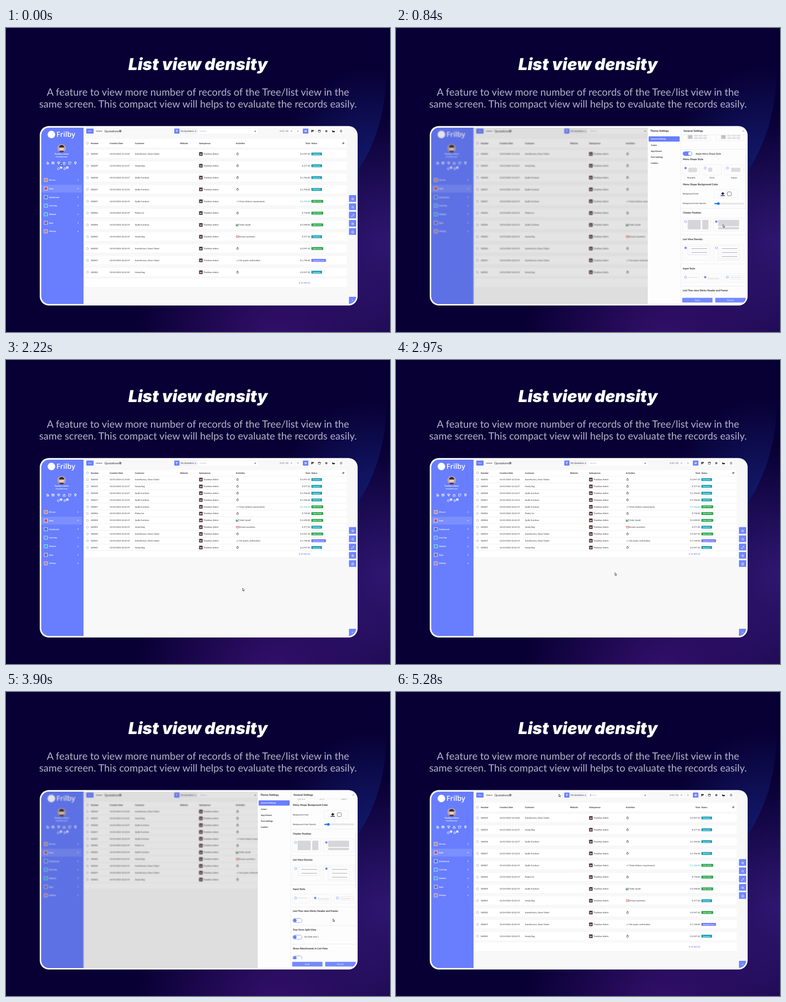
Recreate the animation shown at these times as an HTML page with a canvas. Size 842x665 px, loop 5310 ms.

```html
<!DOCTYPE html>
<html lang="en">
<head>
<meta charset="utf-8">
<title>List view density</title>
<style>
html, body { margin: 0; width: 100%; height: 100%; overflow: hidden; background: #080034; }
canvas { display: block; }
</style>
</head>
<body>
<canvas id="stage" width="842" height="665"></canvas>
<script>
const W = 842, H = 665, LOOP = 5310, STEP = 30;
const NIGHT = '#080034', BLUE = '#6b80ff', INK = '#23232b', LINE = '#e9e9ec', GREY = '#dcdcde';
const SCROLL = 217;
const stage = document.getElementById('stage').getContext('2d');
let g = stage;

// ---------- drawing helpers ----------
function text(str, x, y, size, { color = INK, weight = 400, align = 'left', font = 'Lato', style = '', spacing = 0 } = {}) {
  g.font = `${style} ${weight} ${size}px ${font}, sans-serif`;
  g.textRendering = 'geometricPrecision';
  g.letterSpacing = spacing + 'px';
  g.textAlign = align;
  g.fillStyle = color;
  g.fillText(str, x, y + size * 0.355);
}
function box(x, y, w, h, r, fill, stroke, width = 0.6) {
  g.beginPath();
  g.roundRect(x, y, w, h, r);
  if (fill) { g.fillStyle = fill; g.fill(); }
  if (stroke) { g.strokeStyle = stroke; g.lineWidth = width; g.stroke(); }
}
function dot(x, y, r, fill, stroke, width = 0.7) {
  g.beginPath();
  g.arc(x, y, r, 0, Math.PI * 2);
  if (fill) { g.fillStyle = fill; g.fill(); }
  if (stroke) { g.strokeStyle = stroke; g.lineWidth = width; g.stroke(); }
}
function line(points, color, width = 0.8) {
  g.beginPath();
  points.forEach(([x, y]) => g.lineTo(x, y));
  g.strokeStyle = color;
  g.lineWidth = width;
  g.stroke();
}
function poly(points, fill) {
  g.beginPath();
  points.forEach(([x, y]) => g.lineTo(x, y));
  g.closePath();
  g.fillStyle = fill;
  g.fill();
}
function chevron(x, y, dir, color, s = 1.5, width = 0.9) {
  const shapes = {
    right: [[-s / 2, -s], [s / 2, 0], [-s / 2, s]],
    left: [[s / 2, -s], [-s / 2, 0], [s / 2, s]],
    down: [[-s, -s / 2], [0, s / 2], [s, -s / 2]]
  };
  line(shapes[dir].map(([a, b]) => [x + a, y + b]), color, width);
}
function glow(x, y, r, color, alpha = 1) {
  const fade = g.createRadialGradient(x, y, 0, x, y, r);
  fade.addColorStop(0, `rgba(${color},${alpha})`);
  fade.addColorStop(0.5, `rgba(${color},${alpha * 0.5})`);
  fade.addColorStop(1, `rgba(${color},0)`);
  g.fillStyle = fade;
  g.fillRect(0, 0, W, H);
}
function layer(draw) {
  const c = document.createElement('canvas');
  c.width = W;
  c.height = H;
  g = c.getContext('2d');
  draw();
  g = stage;
  return c;
}

// ---------- poster ----------
function drawPoster() {
  g.fillStyle = NIGHT;
  g.fillRect(0, 0, W, H);
  glow(800, 590, 300, '30,12,84', 0.7);
  glow(835, 470, 280, '46,22,112');
  glow(590, 690, 310, '52,16,108');
  g.save();
  g.beginPath();
  g.arc(438, 100, 396, 0, Math.PI * 2);
  g.clip();
  g.fillStyle = NIGHT;
  g.fillRect(0, 0, W, 340);
  glow(802, 285, 200, '18,24,104');
  g.restore();

  text('List view density', 421, 79, 36, { color: '#fff', weight: 900, align: 'center', font: 'Inter', style: 'italic' });
  const sub = { color: '#b6b2cb', align: 'center', spacing: 0.05 };
  text('A feature to view more number of records of the Tree/list view in the', 421, 140, 22, sub);
  text('same screen. This compact view will helps to evaluate the records easily.', 421, 166, 22, sub);
  box(74, 214.5, 697, 392.5, 20, '#fff');
}

// ---------- application page ----------
const ADMIN = 'Thaddeus Admin', SHOP = 'SomeFactory, Owen Tarbet';
const RUG = 'Handy Rug', SOFA = 'Quillo Furniture', WOOD = 'Planko Inc';
const LATE = '10/24/2024 22:22:19';
const ROWS = [
  ['S00040', '10/25/2024 12:13:05', SHOP, '', '2,947.50', 'Quotation'],
  ['S00039', '10/25/2024 12:12:37', RUG, '', '377.50', 'Quotation'],
  ['S00038', '10/25/2024 12:12:27', SOFA, '', '1,706.00', 'Quotation'],
  ['S00037', '10/25/2024 12:12:24', SOFA, '', '1,706.00', 'Quotation'],
  ['S00007', LATE, SOFA, 'Check delivery requirements', '1,706.00', 'Sales Order'],
  ['S00006', LATE, WOOD, '', '750.00', 'Sales Order'],
  ['S00004', LATE, SOFA, 'Order Upsell', '2,240.00', 'Sales Order'],
  ['S00003', LATE, RUG, 'Answer questions', '377.50', 'Quotation'],
  ['S00020', LATE, SHOP, '', '2,947.50', 'Sales Order'],
  ['S00019', LATE, SHOP, 'Get quote confirmation', '1,740.00', 'Quotation Sent'],
  ['S00002', LATE, RUG, '', '2,947.50', 'Quotation']
];
const BADGES = {
  'Quotation': ['#1b9fb3', 23.5],
  'Sales Order': ['#28a548', 26],
  'Quotation Sent': ['#6b74ff', 32]
};
const MENU = [
  ['Discuss', '#d08a4a'], ['Sales', '#c4524f'], ['Dashboards', '#3f78b5'], ['Invoicing', '#35a5e0'],
  ['Website', '#20b4c4'], ['Apps', '#7a6a9c'], ['Settings', '#c97a80']
];

function portrait(x, y, s) {
  g.save();
  g.translate(x, y);
  g.scale(s, s);
  dot(0, 0.05, 0.5, '#f0c9bb');
  g.beginPath();
  g.arc(0, -0.15, 0.58, Math.PI, 0);
  g.fillStyle = '#35282c';
  g.fill();
  g.beginPath();
  g.ellipse(0, 0.95, 0.7, 0.42, 0, Math.PI, 0);
  g.fillStyle = '#463c48';
  g.fill();
  g.restore();
}

function drawSidebar() {
  g.fillStyle = '#687eff';
  g.fillRect(66, 205, 104, 410);
  dot(99.5, 233, 8.3, '#fff');
  text('Frilby', 110.5, 232, 15.5, { color: '#fff', weight: 600, font: 'Open Sans' });

  dot(122, 263, 9.3, '#b9a6ae');
  g.save();
  g.beginPath();
  g.arc(122, 263, 9.3, 0, Math.PI * 2);
  g.clip();
  portrait(122, 263, 10);
  g.restore();
  const label = { color: '#fff', weight: 700, align: 'center' };
  text(ADMIN, 122, 275.5, 4.3, label);
  text('Good Afternoon', 122, 281.8, 3.6, label);

  const white = '#fff';
  box(89.3, 293, 2.4, 5, 0.3, null, white, 0.9);
  box(91.7, 295, 2, 3, 0.3, null, white, 0.9);
  box(100.5, 293, 5, 4.8, 0.4, null, white, 0.9);
  line([[100.5, 295], [105.5, 295]], white, 1.4);
  box(113, 293, 5, 2.6, 0.4, null, white, 1);
  line([[115.5, 295], [115.5, 298.5]], white, 1.4);
  box(125.2, 295, 4.6, 3.3, 0.4, null, white, 0.9);
  g.beginPath();
  g.arc(127.5, 295, 1.5, Math.PI, 0);
  g.stroke();
  line([[137.5, 293], [142.3, 293], [142.3, 296], [140.5, 298], [137.5, 298], [137.5, 293]], white, 0.9);
  dot(152.2, 294.6, 1.9, null, white, 1.2);
  line([[152.2, 296.5], [152.2, 299]], white, 1.2);
  dot(114.7, 307.8, 2.2, null, white, 0.9);
  dot(128.8, 307.8, 2.2, null, white, 0.9);
  line([[128.8, 308], [128.8, 306.5]], white, 0.7);
  for (const [x, n] of [[120.7, '5'], [134.5, '2']]) {
    box(x - 2.4, 303, 4.8, 4.8, 1, white);
    text(n, x, 305.4, 3.4, { color: '#4a5bd0', weight: 700, align: 'center' });
  }

  box(77, 343, 89.5, 17, 1, 'rgba(255,255,255,.13)');
  MENU.forEach(([name, color], i) => {
    const y = 332.6 + i * 18.72;
    box(82.7, y - 4.6, 9.2, 9.2, 1.4, 'rgba(255,255,255,.4)');
    box(84.6, y - 2.7, 5.4, 5.4, 1, color);
    text(name, 94.2, y, 4.3, { color: '#fff', weight: 700 });
    chevron(158, y, i === 1 ? 'down' : 'right', '#fff', 1.7);
  });
}

function drawToolbar() {
  box(176, 220, 16, 11, 1.2, BLUE);
  text('New', 184, 225.5, 4.3, { color: '#e4e8ff', align: 'center' });
  box(195, 220, 18, 11, 1.2, '#fff');
  text('Upload', 204, 225.5, 4.5, { align: 'center' });
  text('Quotations', 216, 225.5, 6.4);
  dot(250.5, 225.6, 1.7, null, '#333', 1.1);
  for (let a = 0; a < 8; a++) {
    dot(250.5 + 2.4 * Math.cos(a * Math.PI / 4), 225.6 + 2.4 * Math.sin(a * Math.PI / 4), 0.4, '#333');
  }

  box(369, 220, 182, 11, 1.2, '#fff');
  box(380, 220, 40, 11, 1, '#f3f3f6');
  box(369, 220, 11.3, 11, 1.2, BLUE);
  line([[372.6, 223.6], [376.8, 223.6], [374.7, 226], [374.7, 228], [372.6, 223.6]], '#fff', 0.8);
  text('My Quotations', 383, 225.6, 4.4);
  text('×', 415.3, 225.6, 6, { color: '#4656c8', weight: 700, align: 'center' });
  text('Search...', 426, 225.6, 4.4, { color: '#a9a9b0' });
  poly([[544.7, 225], [548.1, 225], [546.4, 227]], INK);

  text('1-11 / 11', 600, 225.5, 4.5);
  for (const [x, dir] of [[626, 'left'], [640, 'right']]) {
    box(x - 5, 220, 10.3, 11, 1.2, '#fff');
    chevron(x, 225.5, dir, '#333', 2, 0.8);
  }
  for (const x of [672, 687, 702.3, 718, 734.7]) box(x - 6, 220, 12, 11, 1.2, '#fff');
  box(651, 220, 12, 11, 1.2, BLUE);
  for (let i = 0; i < 3; i++) line([[654.6, 224 + i * 1.6], [659.6, 224 + i * 1.6]], '#fff', 0.9);
  box(669.6, 223, 2.2, 5, 0.2, '#222');
  box(672.3, 223, 2.2, 3, 0.2, '#222');
  box(684.7, 223.3, 4.8, 4.8, 0.4, null, '#333', 0.8);
  line([[684.7, 224.2], [689.5, 224.2]], '#333', 1.4);
  box(700.2, 223.3, 4.4, 4.8, 0.4, '#777');
  poly([[715.3, 223], [715.3, 228], [721, 228], [721, 226], [719.3, 224.6], [717.8, 226]], '#222');
  clock(734.7, 225.8);
}

function clock(x, y) {
  dot(x, y + 0.2, 2.1, null, '#333', 0.75);
  line([[x, y + 0.4], [x, y - 1]], '#333', 0.6);
  line([[x - 0.9, y - 2.6], [x + 0.9, y - 2.6]], '#333', 0.8);
}

function drawActivity(name, y) {
  if (!name) { clock(507.7, y); return; }
  if (name === 'Order Upsell') {
    line([[504.5, y - 2.5], [504.5, y + 2.4], [510.5, y + 2.4]], '#333', 0.7);
    line([[505, y + 1.8], [507, y - 0.3], [508, y + 0.4], [510.3, y - 2.2]], '#23994b', 1.3);
  } else if (name === 'Answer questions') {
    box(505, y - 2, 5.4, 4, 0.3, '#fff', '#c8504e', 0.8);
    line([[505, y - 2], [507.7, y + 0.4], [510.4, y - 2]], '#c8504e', 0.7);
  } else {
    line([[505.6, y + 0.2], [507, y + 1.7], [509.8, y - 1.5]], '#4a7a60', 0.9);
  }
  text(name, 511.3, y, 4.5);
}

function drawTable({ headY, headH, firstY, gap, rowH, footY }) {
  box(172, headY - headH / 2, 575, headH, 2, '#fff');
  const bold = { weight: 700 };
  dot(178.5, headY, 2.3, '#fff', '#8c96bd');
  [['Number', 186], ['Creation Date', 227.3], ['Customer', 282.8], ['Website', 381.7], ['Salesperson', 423.5], ['Activities', 504], ['Status', 669.5]]
    .forEach(([name, x]) => text(name, x, headY, 4.7, bold));
  text('Total', 666.7, headY, 4.7, { weight: 700, align: 'right' });
  line([[737.5, headY - 1], [741.8, headY - 1]], INK, 0.7);
  line([[737.5, headY + 1], [741.8, headY + 1]], INK, 0.7);
  dot(740.6, headY - 1, 0.8, INK);
  dot(738.8, headY + 1, 0.8, INK);

  ROWS.forEach(([number, date, customer, activity, total, status], i) => {
    const y = firstY + i * gap;
    box(172, y - rowH / 2 + 0.5, 575, rowH, 2, '#f1f1f3');
    box(172, y - rowH / 2, 575, rowH, 2, '#fff');
    dot(178.5, y, 2.3, '#fff', '#8c96bd');
    text(number, 186, y, 4.5);
    text(date, 227.3, y, 4.5);
    text(customer, 282.8, y, 4.5);
    box(423.3, y - 4, 8, 8, 1, '#5b464b');
    portrait(427.3, y - 0.2, 4);
    text(ADMIN, 433, y, 4.5);
    drawActivity(activity, y);
    text('$ ' + total, 666.7, y, 4.5, { align: 'right', color: i === 4 ? '#1b9fb3' : INK });
    const [color, width] = BADGES[status];
    box(669.5, y - 3.1, width, 6.2, 1.2, color);
    text(status, 669.5 + width / 2, y, 3.7, { color: '#fff', weight: 700, align: 'center' });
  });
  box(172, footY - rowH / 2, 575, rowH, 2, '#fff');
  text('$ 19,445.50', 666.7, footY, 4.6, { color: '#4a5cf0', align: 'right' });
}

function drawFloaters() {
  for (let i = 0; i < 5; i++) box(752, 365.6 + i * 18.1, 18, 14.6, 1, '#7186ff');
  box(752, 588, 18, 18, 1, '#7186ff');
  const white = '#fff', star = [];
  for (let i = 0; i <= 10; i++) {
    const a = i * Math.PI / 5 - Math.PI / 2, r = i % 2 ? 1.3 : 2.7;
    star.push([760.2 + r * Math.cos(a), 374 + r * Math.sin(a)]);
  }
  line(star, white);
  for (const y of [391.8, 428]) {
    dot(760, y, 1.9, null, white, 0.8);
    line([[761.3, y + 1.3], [762.6, y + 2.6]], white, 0.9);
  }
  line([[759, 428], [761, 428]], white, 0.6);
  line([[758, 412.4], [762.4, 408]], white, 0.8);
  line([[760.6, 407.8], [762.6, 407.8], [762.6, 409.8]], white, 0.8);
  line([[757.8, 410.6], [757.8, 412.6], [759.8, 412.6]], white, 0.8);
  line([[758.4, 444], [762, 444], [762, 449], [760.2, 447.4], [758.4, 449], [758.4, 444]], white, 0.8);
  chevron(760, 596, 'right', white, 1.5);
}

const WIDE = { headY: 252, headH: 18.5, firstY: 275.5, gap: 25.87, rowH: 18.5, footY: 557.6 };
const COMPACT = { headY: 247, headH: 12.6, firstY: 261.6, gap: 14.86, rowH: 12.8, footY: 424.3 };

function drawPage(layout) {
  g.fillStyle = '#f8f8f8';
  g.fillRect(66, 205, 715, 410);
  drawSidebar();
  drawToolbar();
  drawTable(layout);
  drawFloaters();
}

// ---------- settings panel ----------
function heading(str, y) { text(str, 629, y, 5.6, { weight: 700 }); }
function card(x, y, w, h) { box(x, y, w, h, 1.5, '#fcfcfc', LINE); }
function divider(y) { line([[625, y], [767, y]], '#e6e6ea', 0.7); }
function radio(x, y, on, focus) {
  if (focus) dot(x, y, 3.7, 'rgba(107,128,255,.35)');
  dot(x, y, 2.4, '#fff', '#7186e8', 0.8);
  if (on) dot(x, y, 1.6, '#4f66f0');
}
function toggle(y, on) {
  box(629, y - 4.4, 20, 8.8, 4.4, on ? BLUE : '#fff', BLUE, 0.8);
  dot(on ? 644.6 : 633.4, y, 3.7, on ? '#fff' : BLUE);
}
function triple(y, h) {
  [[628.5, 37.5], [671.5, 42.5], [720, 43]].forEach(([x, w]) => card(x, y, w, h));
}
function menuThumb(x, y, side) {
  if (side) {
    box(x, y, 11, 19, 0.8, '#d3d3d6');
    for (let i = 0; i < 5; i++) line([[x + 2, y + 3 + i * 3.2], [x + 9, y + 3 + i * 3.2]], '#8e8e94', 0.9);
  } else {
    line([[x, y + 0.8], [x + 43, y + 0.8]], '#9a9aa0', 1);
  }
  const left = side ? x + 14 : x, cell = side ? 8.5 : 13;
  for (let r = 0; r < 3; r++)
    for (let c = 0; c < 3; c++) box(left + c * (cell + 1.5), y + 2.5 + r * 6, cell, 4.6, 0.6, '#e1e1e4');
}
function listThumb(x, y, w, count) {
  box(x, y, w, count * 9.4, 1, '#fff', '#dfdfe3');
  for (let i = 0; i < count; i++) {
    const ly = y + 5 + i * 8.6;
    dot(x + 4, ly, 0.8, '#d0d0d4');
    line([[x + 8, ly], [x + w - 4, ly]], '#b9b9be', 1.5);
    line([[x, ly + 4], [x + w, ly + 4]], '#e3e3e6', 0.6);
  }
}

function drawSettings(compact, focus) {
  heading('Theme Style', 246);
  triple(258, 23);
  [635, 678, 726].forEach((x, i) => {
    radio(x, 265.5, i === 1);
    box(x + 6, 263.5, 20, 2.6, 0.6, '#cfcfd3');
    box(x + 6, 266.8, 20, 8.6, 0.8, GREY);
  });
  divider(289);

  heading('Menu Position', 298);
  [309, 342].forEach((y, row) => [628.5, 701.5].forEach((x, col) => {
    card(x, y, 61.5, 27.5);
    radio(x + 6.6, y + 8, row === 0 && col === 1);
    menuThumb(x + 11, y + 4.5, row + col > 0);
  }));
  divider(388);

  toggle(397.3, true);
  text('Apply Menu Shape Style', 657, 397.3, 5.2, { weight: 600 });
  heading('Menu Shape Style', 409.5);
  triple(421, 23.5);
  [635, 678, 726.7].forEach((x, i) => radio(x, 428.8, i === 0));
  box(641, 428, 19, 10, 2.2, GREY);
  dot(689, 432.6, 5, GREY);
  box(735, 428.3, 20, 9, 0, GREY);
  [['Rounded', 647.3], ['Circle', 692.8], ['Square', 741.5]].forEach(([s, x]) => text(s, x, 450.3, 4.4, { align: 'center' }));

  heading('Menu Shape Background Color', 464.3);
  text('Background Color', 629, 485.2, 4.4);
  card(696.5, 476, 53.5, 18);
  poly([[713, 485], [716.5, 481.2], [720, 484.8], [716.4, 488]], '#222650');
  line([[711.8, 489.3], [721, 489.3]], '#222650', 1.4);
  box(726.6, 481, 8.6, 8.6, 1.8, '#fff', '#444', 0.8);
  text('Background Color Opacity', 629, 506.4, 4.4);
  box(698, 505.4, 65, 2.4, 1.2, '#efefef', '#b9b9bd', 0.5);
  box(698, 505.4, 9, 2.4, 1.2, '#1478ee');
  dot(706.8, 506.6, 2.9, '#1478ee');
  divider(517);

  heading('Chatter Position', 526.6);
  card(628.5, 538, 61.5, 29);
  card(696, 538, 67, 29);
  radio(635, 546, false);
  radio(702.3, 546, true);
  box(639.5, 542.3, 28.5, 20.6, 1.6, '#d6d6d8');
  box(671.5, 542.3, 13.5, 20.6, 1.6, '#d6d6d8');
  box(706.3, 542.3, 46, 13.6, 1.6, '#d6d6d8');
  box(706.3, 558, 46, 4.9, 1.6, '#d6d6d8');
  divider(575);

  heading('List View Density', 584);
  card(628.5, 596, 61.5, 35);
  card(696, 596, 67, 35);
  radio(635, 603.4, !compact, focus && !compact);
  radio(702.5, 603.4, compact, focus && compact);
  listThumb(640, 600, 46.5, 2);
  listThumb(706.5, 600, 46, 3);
  divider(638.5);

  heading('Input Style', 648.4);
  triple(659.5, 19.5);
  [635, 678, 726.5].forEach((x, i) => radio(x, 667.6, i === 1));
  const faint = { color: '#c9c9cf' };
  text('Placeholder', 640.5, 668, 4.1, faint);
  text('Placeholder', 683, 669.3, 5, faint);
  line([[683, 673], [710, 673]], '#e0e0e4', 0.6);
  box(731.5, 664.5, 28, 7.5, 1, null, '#dfdfe3');
  text('Placeholder', 734.5, 668.3, 4.1, faint);
  divider(687);

  heading('List/Tree view Sticky Header and Footer', 696);
  toggle(716.7, false);
  divider(728);
  heading('Tree Form Split View', 737.3);
  toggle(753.2, false);
  text('Use Split view ?', 654, 752, 4.6);
  divider(768.5);
  heading('Show Attachments in List View', 778.3);
  toggle(798.7, false);
}

function drawPanel(scroll, compact, focus, applyHot) {
  line([[624.5, 205], [624.5, 615]], LINE, 0.8);
  text('Theme Settings', 557.5, 225, 5.9, { weight: 700 });
  text('General Settings', 630.3, 225, 5.9, { weight: 700 });
  line([[760, 225.3], [761, 226.3], [763, 223.8]], '#333', 0.7);
  box(554, 237, 68, 11.6, 1.5, '#687eff');
  ['General Settings', 'Colors', 'App Drawer', 'Font Settings', 'Loaders'].forEach((name, i) =>
    text(name, 559, 242.8 + i * 13.15, 4.5, { color: i ? INK : '#fff', weight: 700 }));

  g.save();
  g.beginPath();
  g.rect(624.5, 234, 145, 350.6);
  g.clip();
  g.translate(0, -scroll);
  drawSettings(compact, focus);
  g.restore();
  divider(233.7);
  box(766.5, 235 + scroll * 0.343, 1.2, 120, 0.6, '#e2e2e6');
  box(627.5, 590.3, 66.5, 10.2, 1, applyHot ? '#5f76fa' : '#7589ff');
  box(700, 590.3, 66.5, 10.2, 1, '#7589ff');
  const label = { color: '#fff', align: 'center' };
  text('Apply', 660.7, 595.4, 4.4, label);
  text('Discard', 733, 595.4, 4.4, label);
}

// ---------- pointer ----------
const PATH = [
  [0, 120, 296], [150, 115, 294], [450, 115, 294], [690, 717, 430], [1080, 717, 430], [1200, 703, 386],
  [1290, 703, 386], [1500, 681, 598], [1700, 681, 598], [2160, 520, 500], [2640, 480, 465], [2970, 480, 465],
  [3330, 115, 294], [3570, 115, 294], [3780, 717, 496], [3930, 717, 496], [4035, 623, 330], [4230, 636, 351],
  [4410, 636, 351], [4500, 635, 386], [4590, 635, 386], [4800, 672, 597], [4980, 672, 597], [5250, 357, 223], [LOOP, 357, 223]
];
const clamp = v => Math.min(1, Math.max(0, v));
const ease = p => p < 0.5 ? 2 * p * p : 1 - 2 * (1 - p) * (1 - p);

function pointerAt(t) {
  const i = PATH.findIndex((p, n) => n && t < p[0]);
  const [t0, x0, y0] = PATH[i - 1], [t1, x1, y1] = PATH[i];
  const k = ease((t - t0) / (t1 - t0));
  return [x0 + (x1 - x0) * k, y0 + (y1 - y0) * k];
}
function drawPointer(x, y, hand) {
  g.save();
  g.translate(x, y);
  if (hand) {
    box(-0.8, 0, 1.7, 5, 0.8, '#fff', '#222', 0.6);
    box(-1.6, 2.8, 4.4, 3.6, 1.2, '#fff', '#222', 0.6);
  } else {
    const arrow = [[0, 0], [0, 5.8], [1.3, 4.7], [2.2, 6.8], [3.2, 6.4], [2.3, 4.3], [4.1, 4.1], [0, 0]];
    poly(arrow, '#fff');
    line(arrow, '#25252c', 0.75);
  }
  g.restore();
}

// ---------- timeline ----------
const VISITS = [
  { open: 240, scroll: [600, 1050], pick: 1230, close: 2220, compact: true },
  { open: 3510, scroll: [3660, 3870], pick: 4530, close: 4980, compact: false }
];
const poster = layer(drawPoster);
const pages = [WIDE, COMPACT].map(layout => {
  const sharp = layer(() => drawPage(layout));
  const soft = layer(() => {
    g.filter = 'blur(0.9px)';
    g.drawImage(sharp, 0, 0);
    g.filter = 'none';
    g.fillStyle = 'rgba(0,0,0,.105)';
    g.fillRect(0, 0, W, H);
  });
  return { sharp, soft };
});

function render(t) {
  const visit = VISITS.find(v => t >= v.open - 30 && t < v.close);
  const page = pages[t >= VISITS[0].close && t < VISITS[1].close ? 1 : 0];
  const [px, py] = pointerAt(t);

  g.drawImage(poster, 0, 0);
  g.save();
  g.beginPath();
  g.roundRect(77.3, 218, 690.7, 385.7, 17);
  g.clip();
  g.drawImage(page.sharp, 0, 0);
  if (t >= 5040) line([[426.3, 222.5], [426.3, 228.5]], '#555', 0.6);

  if (visit) {
    g.globalAlpha = clamp((t - visit.open + 60) / 105);
    g.drawImage(page.soft, 0, 0);
    g.globalAlpha = 1;
    const slide = ease(clamp((t - visit.open) / 130));
    const [from, to] = visit.scroll;
    const picked = t >= visit.pick;
    box(768 - 216 * slide, 205, 230, 410, 0, '#fdfdfd');
    // The panel stays blank until it has slid in.
    if (slide === 1) {
      drawPanel(SCROLL * ease(clamp((t - from) / (to - from))), picked === visit.compact, picked,
        py > 588 && px < 694 && px > 627);
    }
  }
  const overIcon = (t >= 150 && t <= 450) || (t >= 3330 && t <= 3570);
  drawPointer(px, py, overIcon);
  g.restore();
}

function tick() {
  const t = performance.now() % LOOP;
  render(Math.floor(t / STEP) * STEP);
  requestAnimationFrame(tick);
}
tick();
</script>
</body>
</html>
```
